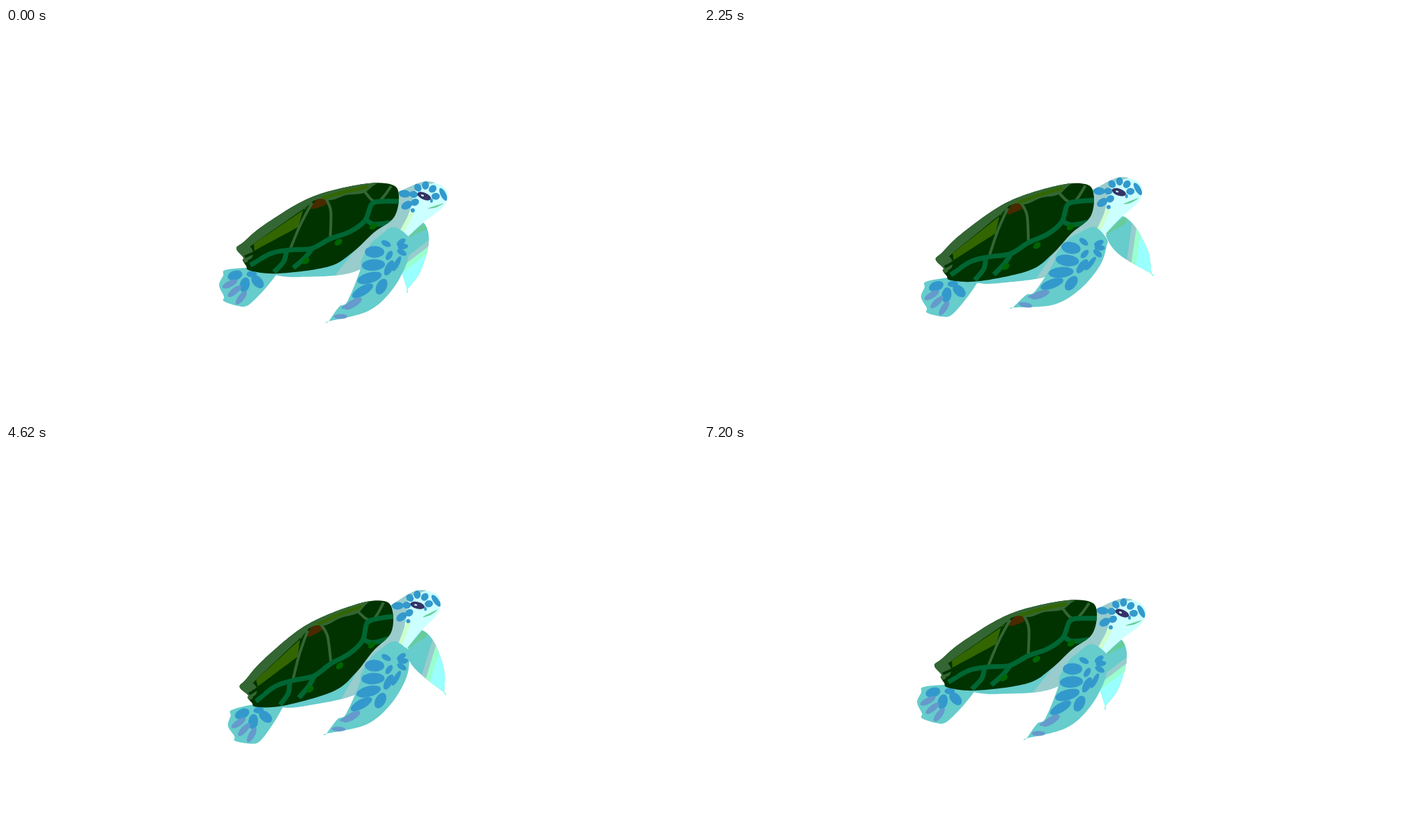
Animation, 997 px wide and 561 px high, one loop 7.23 s. Source, as an HTML page with a canvas:

```html
<!DOCTYPE html>
<html lang="en">
<head>
<meta charset="utf-8">
<title>Swimming turtle</title>
<style>
html, body { margin: 0; width: 100%; height: 100%; overflow: hidden; background: #fff; }
canvas { display: block; }
</style>
</head>
<body>
<canvas id="stage" width="997" height="561"></canvas>
<script>
const ctx = document.getElementById('stage').getContext('2d');
const LOOP = 7230, STROKE = LOOP / 2, STEP = 30, PEAK = 4500;
const TILT = -0.149, NEAR_SWING = 0.305, FAR_SWING = -0.817;
const TEAL = '#66cccc', BLUE = '#3399cc', MAUVE = '#6699cc', GREY = '#99cccc', PALE = '#ccffff';
const DARK = '#003300', MOSS = '#336633', GAP = '#006633', LEAF = '#006600';
const RAD = Math.PI / 180;

const pairs = s => s.split(', ').map(p => p.split(' ').map(Number));

// Smooth curve through key points; a repeated point makes a corner.
function curve(s, closed) {
  const p = pairs(s), n = p.length, path = new Path2D();
  const at = i => p[closed ? (i + n) % n : Math.max(0, Math.min(n - 1, i))];
  path.moveTo(...p[0]);
  for (let i = 0; i < (closed ? n : n - 1); i++) {
    const [a, b, c, d] = [at(i - 1), at(i), at(i + 1), at(i + 2)];
    path.bezierCurveTo(
      b[0] + (c[0] - a[0]) / 6, b[1] + (c[1] - a[1]) / 6,
      c[0] - (d[0] - b[0]) / 6, c[1] - (d[1] - b[1]) / 6, c[0], c[1]);
  }
  if (closed) path.closePath();
  return path;
}
const blob = s => curve(s, true);
const line = s => curve(s, false);

const hindFin = blob('316 349, 352 346, 393 351, 393 351, 375 374, 350 399, 335 401, 314 394, 314 387, 307 371, 313 357');
const farFin = blob('585 272, 570 291, 564 324, 578 377, 578 377, 597 351, 609 310, 604 284');
const neckShade = blob('572 308, 608 278, 609 288, 590 297');
const belly = blob('384 350, 392 357, 425 359, 500 352, 560 315, 572 285, 555 268, 465 338');
const head = blob('560 242, 575 232, 606 221, 631 230, 636 243, 629 259, 602 280, 579 301, 579 301, 545 294, 558 268');
const nape = blob('556 236, 590 222, 618 223, 592 231, 584 257, 568 294, 544 296');
const neckBand = line('570 294, 586 265');
const mouth = blob('608 260, 630 253, 619 259');
const shell = blob('332 318, 342 309, 372 284, 440 244, 515 225, 556 226, 566 242, 559 273, 530 295, 500 323, 465 344, 392 354, 352 350, 346 343, 341 335, 342 331');
const crown = blob('330 332, 357 311, 430 260, 446 248, 469 248, 490 241, 515 238, 530 227, 545 218, 545 210, 400 230, 330 290');
const olive = blob('357 311, 357 311, 428 263, 428 263, 421 287, 421 287, 358 321, 358 321');
const oliveTop = line('455 246, 485 237, 522 229');
const brown = blob('440 261, 447 248, 458 247, 462 254');
const nearFin = blob('537 301, 558 287, 579 300, 581 312, 577 340, 556 378, 522 408, 465 423, 465 423, 480 402, 492 394, 510 350, 512 335, 525 312');

const mossSeams = [line('409 320, 424 284, 441 252'), line('467 306, 468 265, 461 246'),
  line('516 235, 526 247, 534 252'), line('536 252, 545 242, 555 228')];
const gapSeams = [line('352 342, 382 325, 410 320, 440 318, 467 304, 495 294, 517 278, 527 254, 542 250, 566 250'),
  line('404 322, 400 337, 386 352'), line('441 318, 430 332, 414 346'), line('518 276, 531 283, 560 280')];
const tailMarks = [line('344 330, 360 323'), line('349 337, 364 329')];

const fill = (color, path) => {
  ctx.fillStyle = color;
  ctx.fill(path);
};

function stroke(color, width, ...paths) {
  ctx.strokeStyle = color;
  ctx.lineWidth = width;
  paths.forEach(p => ctx.stroke(p));
}

function oval(color, x, y, rx, ry, angle = 0) {
  ctx.fillStyle = color;
  ctx.beginPath();
  ctx.ellipse(x, y, rx, ry, angle, 0, 2 * Math.PI);
  ctx.fill();
}

// Ovals set around a centre, pointing away from it.
function fan(color, x, y, r, degrees, rx, ry) {
  for (const a of degrees.map(d => d * RAD))
    oval(color, x + r * Math.cos(a), y + r * Math.sin(a), rx, ry, a);
}

function group(draw) {
  ctx.save();
  draw();
  ctx.restore();
}

function turn(angle, x, y) {
  ctx.translate(x, y);
  ctx.rotate(angle);
  ctx.translate(-x, -y);
}

function drawHind() {
  fill(TEAL, hindFin);
  fan(BLUE, 349, 351, 20, [163, 105, 48], 11, 7);
  oval(BLUE, 354, 355, 7.5, 4.5);
  fan(MAUVE, 372, 345, 55, [154, 141, 127], 12, 4.5);
}

function drawFar(flap) {
  turn(FAR_SWING * flap, 590, 285);
  fill(TEAL, farFin);
  ctx.clip(farFin);
  group(() => {
    ctx.translate(609, 306);
    ctx.rotate(-0.65);
    [GREY, '#99ffcc', '#99ffff'].forEach((color, i) => {
      ctx.fillStyle = color;
      ctx.fillRect(-100, 7 * i, 200, 200);
    });
  });
  turn(-FAR_SWING * flap, 590, 285);
  fill('#66cc99', neckShade);
}

function drawBelly() {
  fill(TEAL, belly);
  ctx.clip(belly);
  ctx.translate(473, 358);
  ctx.rotate(-0.9);
  ctx.fillStyle = GREY;
  ctx.fillRect(0, 0, 200, 100);
}

function drawHead() {
  fill(PALE, head);
  ctx.clip(head);
  fill(GREY, nape);
  stroke('#ccffcc', 6, neckBand);
  for (let k = 0; k < 6; k++) fan(BLUE, 603, 243, 16, [149 + 42 * k], 6, 5);
  fan(BLUE, 603, 242, 29, [152, 186], 8.5, 5.5);
  oval(BLUE, 586, 263, 3, 3);
  oval(BLUE, 613, 249, 2, 3);
  oval(BLUE, 630, 240, 10, 4, 1.1);
  fill('#66cc99', mouth);
  oval('#333366', 602.5, 242.5, 10.5, 5, 0.4);
  oval(PALE, 600, 241.5, 2.2, 1.2, 0.3);
}

function drawShell() {
  fill(DARK, shell);
  ctx.clip(shell);
  fill(MOSS, crown);
  oval(MOSS, 340, 325, 16, 14);
  fill('#336600', olive);
  stroke('#336600', 5, oliveTop);
  fill('#4a2a00', brown);
  stroke(MOSS, 4, ...mossSeams);
  stroke(GAP, 7, ...gapSeams);
  for (const [x, y] of pairs('479 309, 529 286, 432 336')) oval(LEAF, x, y, 6, 4, -0.6);
  stroke(DARK, 4, ...tailMarks);
}

function drawNear(flap) {
  turn(NEAR_SWING * flap, 550, 307);
  fill(TEAL, nearFin);
  // Leading row of scales, from shoulder to tip along a quadratic curve.
  const along = (a, b, c, u) => (1 - u) ** 2 * a + 2 * u * (1 - u) * b + u * u * c;
  for (let k = 0; k < 6; k++) {
    const u = k / 5;
    oval(k < 4 ? BLUE : MAUVE, along(531, 532, 482, u), along(323, 370, 416, u),
      14 + 6 * Math.sin(Math.PI * u) - 4 * u, 8.5 - 5 * u * u, -0.6 * Math.sin(Math.PI * u * u));
  }
  oval(MAUVE, 488, 402, 5, 2, -0.5);
  for (const [x, y] of pairs('541 373, 552 346, 563 340')) oval(BLUE, x, y, 12, (570 - x) / 6 + 2.5, -1.1);
  fan(BLUE, 559, 317, 13, [-38, -8, 30, 122, 208], 7.5, 4);
}

function draw(t) {
  const tilt = TILT * (t < PEAK ? t / PEAK : (1 + Math.cos(Math.PI * (t - PEAK) / (LOOP - PEAK))) / 2);
  const flap = (1 - Math.cos(2 * Math.PI * t / STROKE)) / 2;
  const part = (pivot, paint) => group(() => {
    turn(tilt, pivot, 302);
    paint(flap);
  });
  const back = paint => part(543, paint), front = paint => part(522, paint);

  ctx.fillStyle = '#fff';
  ctx.fillRect(0, 0, 997, 561);
  back(drawHind);
  front(drawFar);
  back(drawBelly);
  front(drawHead);
  back(drawShell);
  front(drawNear);
}

const start = performance.now();
function tick() {
  const t = (performance.now() - start) % LOOP;
  draw(Math.floor(t / STEP) * STEP);
  requestAnimationFrame(tick);
}
tick();
</script>
</body>
</html>
```
